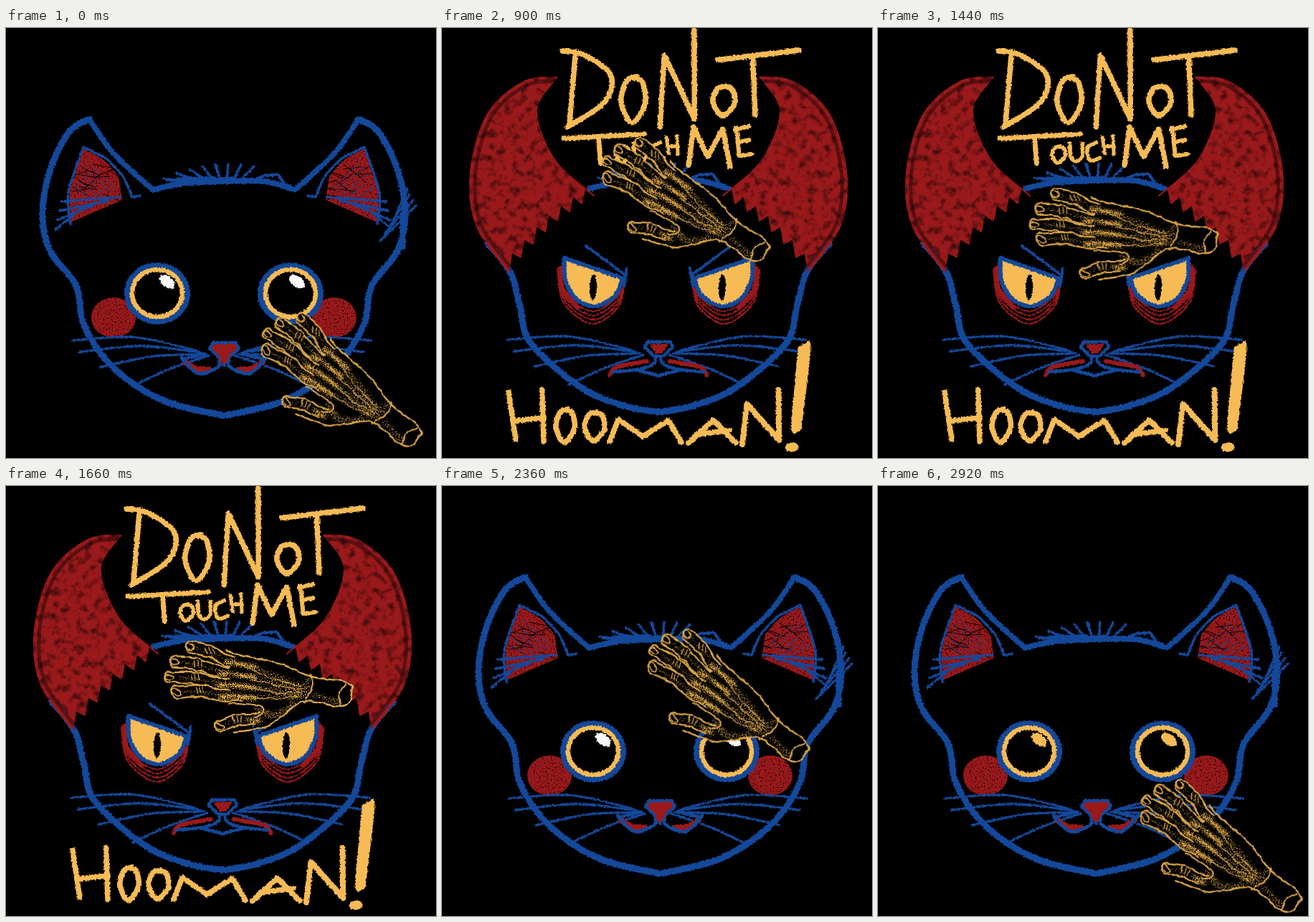
Recreate the animation shown at these times as an HTML page. Size 600x600 px, loop 2950 ms.

```html
<!DOCTYPE html>
<html lang="en">
<head>
<meta charset="utf-8">
<title>Do not touch me hooman!</title>
<style>
html, body { margin: 0; width: 100%; height: 100%; overflow: hidden; background: #000; }
#stage { position: relative; width: 600px; height: 600px; overflow: hidden; background: #000; }
#face, svg.layer { position: absolute; left: 0; top: 0; width: 600px; height: 600px; }
path, ellipse { fill: none; stroke-linecap: round; stroke-linejoin: round; }
.blue { stroke: #14489a; }
.red { stroke: #9a191b; }
.amber { stroke: #f7bb55; }
.gold { stroke: #dda746; }
.black { stroke: #000; }
.fill-red { fill: #9a191b; }
.fill-amber { fill: #f7bb55; }
.fill-black { fill: #000; }
.faint { opacity: .4; }
.glint { fill: #f8f8f8; animation: glint 2950ms step-end infinite; }
#cute { animation: cute 2950ms step-end infinite; }
#angry { opacity: 0; animation: angry 2950ms step-end infinite; }
#hand { transform-origin: 362px 256px; will-change: transform; animation: pet 2950ms linear infinite; }
@keyframes cute { 0% { opacity: 1 } 22.4% { opacity: 0 } 63% { opacity: 1 } }
@keyframes angry { 0% { opacity: 0 } 22.4% { opacity: 1 } 63% { opacity: 0 } }
@keyframes glint { 0% { fill: #f8f8f8 } 97% { fill: #f7bb55 } }
@keyframes pet {
  0% { transform: translate(125px, 229px) rotate(30deg) }
  18.64% { transform: translate(0, -27px) rotate(30deg) }
  30.51% { transform: translate(-5px, -23px) rotate(25deg) }
  41.69% { transform: translate(-19px, 14px) rotate(0deg) }
  56.27% { transform: translate(0, 0) rotate(0deg) }
  69.83% { transform: translate(8px, -16px) rotate(12deg) }
  80% { transform: translate(56px, 30px) rotate(29.5deg) }
  98.98%, 100% { transform: translate(135px, 240px) rotate(29.5deg) }
}
</style>
</head>
<body>
<div id="stage">
  <svg width="0" height="0" style="position:absolute">
    <defs>
      <filter id="rough" filterUnits="userSpaceOnUse" x="0" y="0" width="600" height="600" color-interpolation-filters="sRGB">
        <feTurbulence type="fractalNoise" baseFrequency=".35" numOctaves="2" seed="4"/>
        <feColorMatrix values="1 0 0 0 0  0 1 0 0 0  0 0 1 0 0  0 0 0 0 1"/>
        <feDisplacementMap in="SourceGraphic" scale="4" xChannelSelector="R" yChannelSelector="G"/>
      </filter>
      <filter id="wobble" filterUnits="userSpaceOnUse" x="0" y="0" width="600" height="600" color-interpolation-filters="sRGB">
        <feTurbulence type="fractalNoise" baseFrequency=".07" numOctaves="2" seed="9"/>
        <feColorMatrix values="1 0 0 0 0  0 1 0 0 0  0 0 1 0 0  0 0 0 0 1"/>
        <feDisplacementMap in="SourceGraphic" scale="6" xChannelSelector="R" yChannelSelector="G"/>
      </filter>
      <filter id="grain" filterUnits="userSpaceOnUse" x="0" y="0" width="600" height="600" color-interpolation-filters="sRGB">
        <feTurbulence type="fractalNoise" baseFrequency=".5" numOctaves="2" seed="2"/>
        <feColorMatrix values="0 0 0 0 0  0 0 0 0 0  0 0 0 0 0  4 0 0 0 -.8" result="m"/>
        <feComposite in="SourceGraphic" in2="m" operator="in"/>
      </filter>
      <filter id="mottle" filterUnits="userSpaceOnUse" x="0" y="0" width="600" height="600" color-interpolation-filters="sRGB">
        <feTurbulence type="fractalNoise" baseFrequency=".09" numOctaves="5" seed="7"/>
        <feColorMatrix values="0 0 0 0 0  0 0 0 0 0  0 0 0 0 0  1.6 0 0 0 .15" result="m"/>
        <feComposite in="SourceGraphic" in2="m" operator="in"/>
      </filter>
      <filter id="stipple" filterUnits="userSpaceOnUse" x="0" y="0" width="600" height="600" color-interpolation-filters="sRGB">
        <feGaussianBlur in="SourceGraphic" stdDeviation="2.2" result="b"/>
        <feTurbulence type="fractalNoise" baseFrequency=".8" numOctaves="2" seed="5"/>
        <feColorMatrix values="0 0 0 0 0  0 0 0 0 0  0 0 0 0 0  3 0 0 0 -1" result="n"/>
        <feComposite in="b" in2="n" operator="arithmetic" k2="1" k3="1" k4="-1"/>
        <feColorMatrix values="0 0 0 0 0  0 0 0 0 0  0 0 0 0 0  0 0 0 3 0" result="dots"/>
        <feFlood flood-color="#dda746"/>
        <feComposite in2="dots" operator="in"/>
      </filter>
    </defs>
  </svg>
  <div id="face">
    <svg class="layer" id="cute" viewBox="0 0 600 600"></svg>
    <svg class="layer" id="angry" viewBox="0 0 600 600"></svg>
  </div>
  <svg class="layer" id="hand" viewBox="0 0 600 600"></svg>
</div>
<script>
const make = (parent, tag, attrs) => {
  const el = document.createElementNS("http://www.w3.org/2000/svg", tag);
  for (const k in attrs) el.setAttribute(k, attrs[k]);
  return parent.appendChild(el);
};
const layer = (id, filter) => make(document.getElementById(id), "g", { filter: `url(#${filter})` });
const mirrored = (g, axis = 304) => make(g, "g", { transform: `translate(${axis * 2} 0) scale(-1 1)` });
const repeat = (n, f) => Array.from({ length: n }, (_, i) => f(i));
const mix = (a, b, t) => a + (b - a) * t;

let seed = 11;
const random = () => (seed = seed * 16807 % 2147483647) / 2147483647;

// Smooth curve through "x,y x,y ...", placed in a box
function curve(text, lead, [x, y, w, h]) {
  const p = text.trim().split(/\s+/).map(s => s.split(",").map(Number)).map(([u, v]) => [x + u * w, y + v * h]);
  const at = i => p[Math.max(0, Math.min(p.length - 1, i))];
  let d = lead + p[0];
  for (let i = 0; i < p.length - 1; i++) {
    const [a, b, c, e] = [at(i - 1), at(i), at(i + 1), at(i + 2)];
    const h1 = b.map((v, k) => v + (c[k] - a[k]) / 6);
    const h2 = c.map((v, k) => v - (e[k] - b[k]) / 6);
    d += `C${h1} ${h2} ${c}`;
  }
  return d;
}
// ";" starts a new stroke, "|" marks a corner
const shape = (text, box = [0, 0, 1, 1]) =>
  text.split(";").map(s => s.split("|").map((c, i) => curve(c, i ? "L" : "M", box)).join("")).join("");

const draw = (g, cls, width, text, box) => make(g, "path", { class: cls, "stroke-width": width, d: shape(text, box) });
const oval = (g, cls, width, cx, cy, rx, ry, turn = 0) =>
  make(g, "ellipse", { class: cls, "stroke-width": width, cx, cy, rx, ry, transform: `rotate(${turn} ${cx} ${cy})` });
const both = (g, paint, axis) => { paint(g); paint(mirrored(g, axis)); };

function tuft(g) {
  draw(g, "blue", 8, "208,225 245,217 305,214 360,214 402,225");
  draw(g, "blue", 4, "343,214 360,206|380,205 392,222");
  repeat(8, i => {
    const x = 220 + 18 * i, y = 190 + (x - 310) ** 2 / 400;
    draw(g, "blue", 3.5, `${x},${y} ${mix(x, 307, .55)},${mix(y, 217, .9)}`);
  });
  repeat(5, i => draw(g, "blue", 4, `${225 + 15 * i},${215 - 5 * random()} ${262 + 14 * i},${207 + 9 * random()}`));
}

function whiskers(g) {
  both(g, side => repeat(4, i => {
    const x = 93 + 9.5 * i * i, y = 436 + 14 * i + 2.3 * i * i;
    const rootX = 268 + 5 * i, rootY = 451 + 2 * i, lift = 12 - 3 * i;
    draw(side, "blue", 3.2, `${x},${y} ${mix(x, rootX, .5)},${mix(y, rootY, .5) - lift} ${rootX},${rootY}`);
  }), 301);
}

function nose(g) {
  draw(g, "fill-black blue", 4.5, "285,446|289,439|321,439|324,446|311,459|298,459|285,446");
  draw(g, "fill-red", 0, "291,442|318,442|309,455|300,455|291,442");
}

function ear(g) {
  draw(g, "fill-red", 0, "108,168 136,184 157,207|162,240|88,272|89,225 108,168");
  repeat(16, () => {
    const x = 90 + 60 * random(), y = 185 + 50 * random();
    draw(g, "black", 1, `${x},${y} ${x + 24},${y - 22 + 44 * random()}`);
  });
}

function fur(g) {
  draw(g, "blue", 3.5, "90,274 87,230 108,166|140,182 163,207 176,236|187,234");
  repeat(4, i => draw(g, "blue", 3.5, `${78 - 3 * i},${242 + 13 * i} ${160 - 18 * i},${236 + 5 * i}`));
  repeat(5, i => draw(g, "blue", 1, `${95 + 4 * i},${222 - 9 * i} ${125 + 7 * i},${240 - 4 * i}`));
}

function drawCute() {
  const reds = layer("cute", "grain");
  both(reds, ear);
  both(reds, g => oval(g, "fill-red", 0, 150, 404, 31, 28));

  const ink = layer("cute", "rough");
  both(ink, g => {
    draw(ink === g ? ink : g, "blue", 9, "116,127 88,145 61,200 51,262 62,312 98,360 109,415 150,474 220,520 304,541");
    draw(g, "blue", 7.5, "116,127 150,175 205,226");
    fur(g);
  });
  draw(ink, "blue", 8, "553,262 554,305");
  repeat(4, i => draw(ink, "blue", 3, `${522 + 6 * i},${297 - 9 * i} ${572 - 4 * i},${248 - 8 * i}`));
  tuft(ink);
  whiskers(ink);

  both(ink, g => draw(g, "red", 8, "250,466 264,475 284,477"));
  draw(ink, "fill-red blue", 4, "284,447|289,439|321,439|325,447|311,460|304,470|297,460|284,447");
  draw(ink, "fill-red", 0, "290,442|319,442|311,457|312,468|296,468|299,457|290,442");
  both(ink, g => draw(g, "blue", 4.5, "297,464 296,473 268,482 245,460;247,462 278,455"));

  for (const x of [211, 397]) {
    oval(ink, "fill-black blue", 9, x, 370.5, 41.5, 38.5);
    oval(ink, "amber", 6.5, x, 370, 35, 33);
  }
  for (const x of [225, 406]) oval(ink, "glint", 0, x, 354, 12.5, 7.5, 38);
}

// Letter strokes in a unit box
const glyphs = {
  D: ".25,.08 .14,.95;0,0 .42,.05 .95,.32 .82,.68 .1,1",
  O: ".6,0 .2,.1 0,.55 .42,1 .95,.6 .85,.12 .5,.02",
  N: "0,1 .12,.26|.93,.92|.92,0",
  T: "0,.15 1,0;.43,.1 .46,1",
  U: "0,0 .05,.75 .5,1 .95,.7 .95,0",
  C: ".75,0 .1,.25 .1,.8 .45,1 1,.85",
  H: "0,.05 .2,.95;.95,0 1,1;.15,.6 1,.54",
  M: "0,.97|.12,0|.46,.75|.82,.05|1,1",
  E: ".08,.05 .25,1|1,.95;0,.12 .85,0;.15,.55 .85,.47",
  A: "0,1|.52,0|1,1;.2,.62 .86,.45"
};

function letters(g) {
  const put = (letter, width, ...box) => draw(g, "amber", width, glyphs[letter], box);
  put("D", 7.5, 170, 33, 71, 106);
  put("O", 7.5, 252, 69, 35, 64);
  put("N", 7.5, 306, 4, 52, 135);
  put("O", 7.5, 380, 82, 32, 41);
  put("T", 7.5, 387, 32, 113, 90);
  put("T", 7, 172, 149, 112, 41);
  put("O", 5.5, 245, 166, 19, 23);
  put("U", 5.5, 270, 162, 18, 25);
  put("C", 5.5, 293, 161, 18, 25);
  put("H", 5, 315, 152, 16, 25);
  put("M", 7.5, 346, 139, 58, 55);
  put("E", 6, 411, 138, 23, 41);
  put("H", 7.5, 95, 506, 49, 72);
  put("O", 7.5, 161, 533, 27, 46);
  put("O", 7.5, 201, 537, 29, 40);
  put("M", 7.5, 236, 547, 100, 32);
  put("A", 7.5, 346, 548, 66, 32);
  put("N", 8, 421, 506, 55, 76);
  draw(g, "fill-amber amber", 3, "500,448 508,443 515,450 502,560|494,566|490,560|500,448");
  oval(g, "fill-amber", 0, 490, 586, 10, 6.5, -6);
}

function horn(g) {
  const teeth = repeat(15, i => {
    const t = i / 14, notch = i % 2 ? 16 : 0;
    return `${mix(95, 214, t) - notch / 4},${mix(340, 235, t) - notch - 10 * Math.sin(Math.PI * t)}`;
  }).join("|");
  const outer = "162,70 115,77 65,123 42,205 51,278 95,340", inner = "214,235 160,186 134,117 162,70";
  draw(g, "fill-red red", 2, `${outer}|${teeth}|${inner}`);
  draw(g, "black faint", 5, outer, [8, 7, .96, .97]);
  draw(g, "red", 3, outer);
}

function glare(g) {
  repeat(4, i => draw(g, "red", 2.2,
    `${163 + 2 * i},${338 - 2 * i} ${172 + i},${385 - 4 * i} 212,${414 - 6 * i} ${248 - i},${390 - 4 * i} 256,360`));
  draw(g, "red", 6, "169,335 170,364 192,391");
  draw(g, "fill-amber blue", 6, "173,322 174,352 190,380 217,389 244,374 254,350|173,322");
  draw(g, "blue", 4, "203,305 258,346;260,336 256,361");
}

function drawAngry() {
  const ink = layer("angry", "rough");
  both(ink, g => draw(g, "blue", 9, "66,302 97,341 111,390 126,441 195,502 255,528 304,537"));
  tuft(ink);
  both(layer("angry", "mottle"), horn);

  const front = layer("angry", "rough");
  both(front, glare);
  for (const x of [213, 393]) oval(front, "fill-black", 0, x, 363, 5, 18, 2);
  whiskers(front);
  both(front, g => {
    draw(front === g ? front : g, "red", 6, "236,485 246,474 288,466");
    draw(g, "blue", 4.5, "300,459 298,469 278,477 240,481;272,478 304,486");
  });
  nose(front);
  letters(front);
}

function drawHand() {
  // Finger k: tips lie on a parabola, knuckles on a slanted line
  const fingers = repeat(4, k => ({
    x: 222 + 8 * (k - 1.9) ** 2 + 7, y: 225 + 21 * k,
    baseX: 342, baseY: 252 + 13 * k, width: 14 + k / 2
  })).reverse();
  fingers.push({ x: 298, y: 336, baseX: 375, baseY: 315, width: 13 });
  const along = (f, t) => [mix(f.x, f.baseX, t), mix(f.y, f.baseY, t) - 3 * Math.sin(Math.PI * t * 2)];

  const skin = layer("hand", "wobble");
  for (const f of fingers) {
    const line = [0, .3, .6, 1].map(t => along(f, t)).join(" ");
    draw(skin, "gold", f.width + 3, line);
    for (const t of [.3, .62]) oval(skin, "gold", 4, ...along(f, t), 8, f.width / 2);
    draw(skin, "black", f.width - 1.5, line);
    for (const t of [.3, .62]) oval(skin, "fill-black", 0, ...along(f, t), 8, f.width / 2);
  }
  const top = "322,234 388,250 420,265 476,274 482,288 471,308 414,301 370,333 345,340";
  draw(skin, "fill-black", 0, `${top}|358,316 340,308|312,284 312,255 322,234`);
  draw(skin, "gold", 2.4, `308,229 ${top} 318,343`);
  draw(skin, "gold", 2, "312,303 352,307 360,314 348,323;425,264 428,280 417,303;474,276 465,290 469,308");
  for (const f of fingers) {
    oval(skin, "gold", 1.8, f.x - 1, f.y, 6, 3.8, 12);
    const [x, y] = along(f, .3);
    repeat(3, i => draw(skin, "gold", 1.3, `${x - 5 + 5 * i},${y - 5} ${x - 3 + 5 * i},${y + 3}`));
  }

  const shade = layer("hand", "stipple");
  for (const f of fingers) {
    const [x, y] = along(f, .62);
    draw(shade, "gold", 6, `${x - 4},${y + 3} ${x + 8},${y + 3}`);
    draw(shade, "gold faint", 5, `${along(f, .1)} ${along(f, .95)}`);
  }
  repeat(4, k => {
    const y = 248 + 15 * k, wristY = 279 + 5 * k;
    draw(shade, "gold", 6, `${320 - 3 * k},${y} 348,${y + 4}`);
    draw(shade, "gold faint", 8, `335,${y + 2} 412,${wristY}`);
    draw(skin, "gold", 1.2, `325,${y} 375,${mix(y, wristY, .6) + 3} 412,${wristY}`);
  });
  draw(shade, "gold faint", 9, "350,312 375,320 402,304;430,292 464,302;421,270 420,296");
}

drawCute();
drawAngry();
drawHand();

// The face trembles while it is being petted
const loop = 2950, beat = 90;
const shakes = repeat(Math.ceil(loop / beat), i => ({
  offset: i * beat / loop,
  easing: "step-end",
  transform: i >= 7 && i < 25 && i % 2 === 0 ? "translate(-2px, -1px)" : "none"
}));
shakes.push({ offset: 1, transform: "none" });
document.getElementById("face").animate(shakes, { duration: loop, iterations: Infinity });
</script>
</body>
</html>
```
